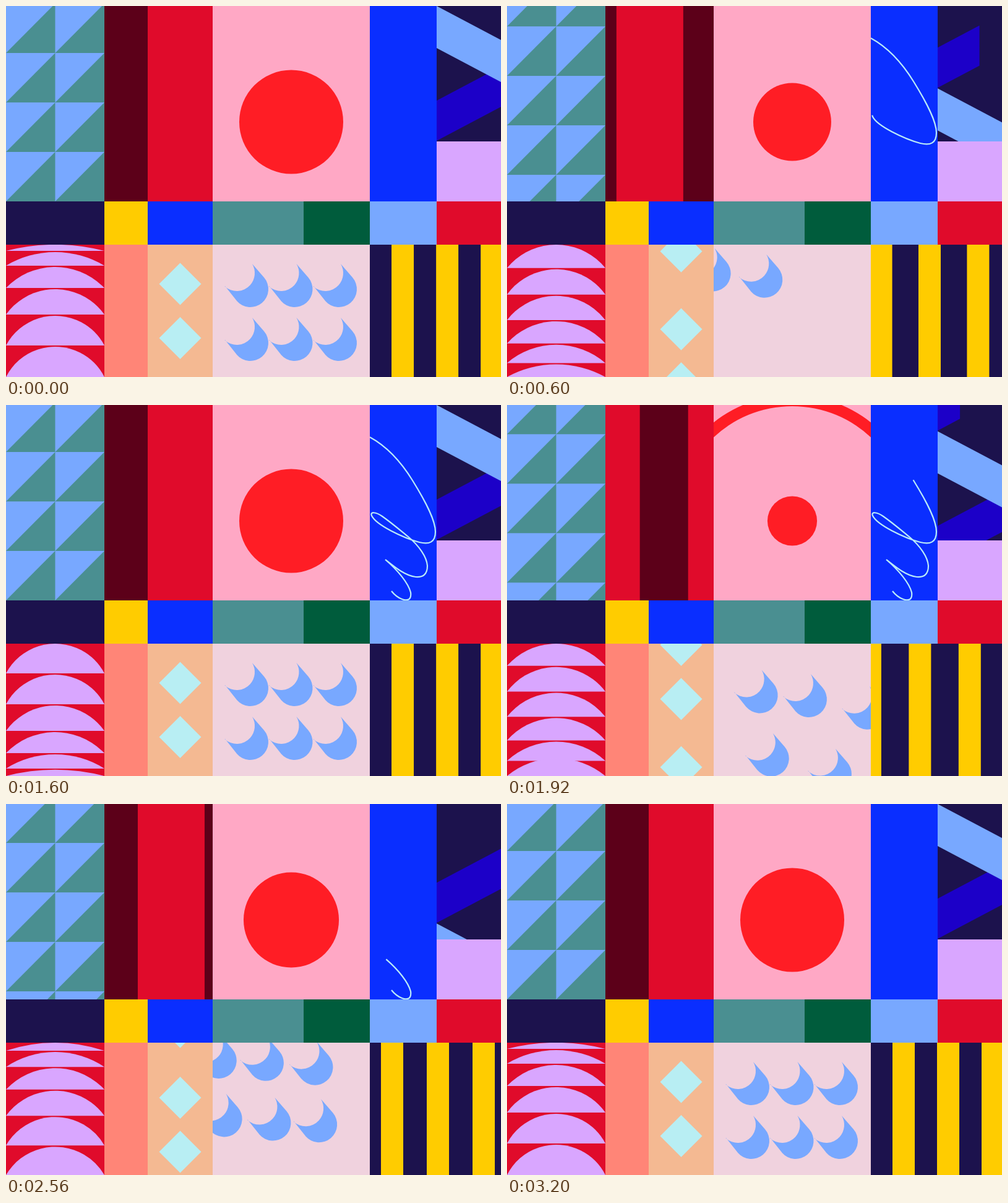
Animation, 800 px wide and 600 px high, one loop 3240 ms. Source, as an HTML page with a canvas:

```html
<!DOCTYPE html>
<html lang="en">
<head>
<meta charset="utf-8">
<title>Moving mosaic</title>
<style>
  html, body { margin: 0; width: 100%; height: 100%; overflow: hidden; }
  canvas { display: block; width: 800px; height: 600px; }
</style>
</head>
<body>
<canvas id="stage" width="800" height="600"></canvas>
<script>
const ctx = document.getElementById('stage').getContext('2d');
const LOOP = 3240, CYCLE = 1600;
const C = {
  sky: '#78a8ff', teal: '#4a8f91', maroon: '#5c0019', red: '#e00b2b', pink: '#ffa8c5',
  sun: '#ff1d25', blue: '#0a2eff', navy: '#1c124d', indigo: '#1c00c8', lilac: '#d9a6ff',
  yellow: '#ffcc00', green: '#005c3c', salmon: '#ff8577', tan: '#f4b992', mint: '#b8eef3',
  blush: '#f0d2de'
};

// Timing curve with control points (x1, 0) and (x2, 1).
const bezier = (x1, x2) => u => {
  if (u <= 0 || u >= 1) return u <= 0 ? 0 : 1;
  let lo = 0, hi = 1, s;
  for (let i = 0; i < 30; i++) {
    s = (lo + hi) / 2;
    const q = 1 - s;
    if (3 * x1 * s * q * q + 3 * x2 * s * s * q + s * s * s < u) lo = s; else hi = s;
  }
  return s * s * (3 - 2 * s);
};
const ease = {
  snap: bezier(.31, .04),
  stripe: bezier(.27, .08),
  sun: bezier(.14, .09),
  diamond: bezier(.19, .29),
  scroll: bezier(.33, .2),
  pen: bezier(.33, .35),
  bar: bezier(.09, .59)
};
const mix = (a, b, k) => a + (b - a) * k;
const clamp = v => Math.min(1, Math.max(0, v));

function rect(x, y, w, h, color) {
  ctx.fillStyle = color;
  ctx.fillRect(x, y, w, h);
}

function poly(color, ...pts) {
  ctx.fillStyle = color;
  ctx.beginPath();
  pts.forEach(p => ctx.lineTo(...p));
  ctx.fill();
}

function disc(r, color) {
  ctx.fillStyle = color;
  ctx.beginPath();
  ctx.arc(461, 187.5, r, 0, 7);
  ctx.fill();
}

function cell(x, y, w, h, color, draw) {
  ctx.save();
  ctx.beginPath();
  ctx.rect(x, y, w, h);
  ctx.clip();
  rect(x, y, w, h, color);
  draw();
  ctx.restore();
}

function triangles(u) {
  const shift = 160 * ease.snap(u) % 80;
  for (let row = -1; row < 5; row++) {
    const y = row * 80 - 4 + shift;
    for (const x of [0, 79.5]) poly(C.teal, [x, y + 80], [x + 79.5, y], [x + 79.5, y + 80]);
  }
}

function stripes(u) {
  const x = 151 + 186 * ease.stripe(u);
  rect(x, 0, 78, 316, C.maroon);
  rect(x - 186, 0, 78, 316, C.maroon);
}

function sun(u) {
  const e = ease.sun(u), outer = 84 + 251 * e, hole = 389 * e;
  if (hole < outer) {
    disc(outer, C.sun);
    disc(hole, C.pink);
  }
  disc(84 * e, C.sun);
}

const SCRIBBLE = 'M588 52C612 65 636 88 657 122C678 156 694 186 694 205C694 222 684 226 668 222' +
  'C642 215 598 194 591 179C588 172 598 173 608 180C625 192 640 205 650 213' +
  'C668 228 680 246 681 260C681 274 674 279 662 278C645 276 628 262 613 250' +
  'C634 268 650 288 654 303C656 318 645 316 640 314C632 311 627 306 623 301';
const penPath = new Path2D(SCRIBBLE);
const probe = document.createElementNS('http://www.w3.org/2000/svg', 'path');
probe.setAttribute('d', SCRIBBLE);
const penLength = probe.getTotalLength();

function scribble(u, back) {
  const e = ease.pen(u), from = back ? e : 0, to = back ? 1 : e;
  if (to - from < .001) return;
  ctx.strokeStyle = '#b9eaf8';
  ctx.lineWidth = 2.2;
  ctx.setLineDash([penLength * (to - from), penLength * 2]);
  ctx.lineDashOffset = -penLength * from;
  ctx.stroke(penPath);
}

// Slanted band between two x positions; y is its top at the left wall.
function band(y, thick, slope, x1, x2, color) {
  const a = y + slope * (x1 - 696), b = y + slope * (x2 - 696);
  poly(color, [x1, a], [x2, b], [x2, b + thick], [x1, a + thick]);
}

function ribbon(u) {
  const y = 219 * ease.scroll(u), slope = 55 / 104;
  const rise = clamp(u * 1.73), turn = clamp((u - .6) / .36);
  const fold = turn * turn * (3 - 2 * turn);
  band(153 + y, 65, -slope, 696, 800, C.indigo);
  band(y, 68, slope, 696, 800, C.sky);
  band(y - 66, 65, -slope, 696, 696 + 104 * rise, C.indigo);
  band(y - 219, 68, slope, 800 - 104 * fold, 800, C.sky);
}

const DOMES_A = [396, 420, 456, 499, 549, 600];
const DOMES_B = [434, 484, 527, 563, 588, 600];

function domes(u, back) {
  const e = ease.snap(u), k = back ? 1 - e : e;
  let top = 386;
  ctx.fillStyle = C.lilac;
  DOMES_A.forEach((a, i) => {
    const bottom = mix(a, DOMES_B[i], k);
    if (i === 5 && back) top = mix(590, 552, 1 - (1 - u) ** 3);
    const h = bottom - top, r = (79.5 ** 2 + h * h) / (2 * h), half = Math.asin(79.5 / r);
    ctx.beginPath();
    ctx.arc(79.5, top + r, r, -Math.PI / 2 - half, -Math.PI / 2 + half);
    ctx.fill();
    top = bottom + 2;
  });
}

function diamonds(u) {
  const leave = 449.5 - 192 * ease.snap(u);
  const enter = 449.5 + 192 * (1 - ease.diamond(u));
  for (const y of [leave, leave + 87.5, enter, enter + 87.5]) {
    poly(C.mint, [281.5, y - 34], [315.5, y], [281.5, y + 34], [247.5, y]);
  }
}

function drop(x, y) {
  ctx.beginPath();
  ctx.arc(x, y, 29, -.71, 2.47);
  ctx.lineTo(x - 41, y - 5);
  ctx.arc(x - 22, y - 26, 29, 2.306, -.54, true);
  ctx.fill();
}

const DROP_ORDER = [5, 4, 2, 3, 1, 0];

function drops(u) {
  ctx.fillStyle = C.sky;
  DROP_ORDER.forEach((k, i) => {
    const x = 395 + 71.5 * (i % 3), y = 458 + 87 * Math.floor(i / 3);
    const out = (21.6 * Math.max(0, u - .018 * k)) ** 3;
    const back = 32 * 1.1 ** k * ((1 - u) / .4) ** 3;
    drop(x + out, y + out * .84);
    drop(x - back, y - back * .84);
  });
}

function bars(u) {
  const first = 551 + 72 * ease.bar(u);
  const gap = 72 + 96 * u * (1 - u) ** 3.67;
  for (let i = -1; i < 5; i++) rect(first + gap * i, 386, 36, 214, C.yellow);
}

function draw(t) {
  const time = t % LOOP;
  const rest = time >= 2 * CYCLE;
  const u = rest ? 0 : time % CYCLE / CYCLE;
  const back = !rest && time >= CYCLE;

  cell(0, 0, 159, 316, C.sky, () => triangles(u));
  cell(159, 0, 175, 316, C.red, () => stripes(u));
  cell(334, 0, 254, 316, C.pink, () => sun(u));
  cell(588, 0, 108, 316, C.blue, () => scribble(u, back));
  cell(696, 0, 104, 219, C.navy, () => ribbon(u));
  rect(696, 219, 104, 97, C.lilac);

  rect(0, 316, 159, 70, C.navy);
  rect(159, 316, 70, 70, C.yellow);
  rect(229, 316, 105, 70, C.blue);
  rect(334, 316, 147, 70, C.teal);
  rect(481, 316, 107, 70, C.green);
  rect(588, 316, 108, 70, C.sky);
  rect(696, 316, 104, 70, C.red);

  cell(0, 386, 159, 214, C.red, () => domes(u, back));
  rect(159, 386, 70, 214, C.salmon);
  cell(229, 386, 105, 214, C.tan, () => diamonds(u));
  cell(334, 386, 254, 214, C.blush, () => drops(u));
  cell(588, 386, 212, 214, C.navy, () => bars(u));
}

const start = performance.now();
function tick() {
  draw(performance.now() - start);
  requestAnimationFrame(tick);
}
tick();
</script>
</body>
</html>
```
